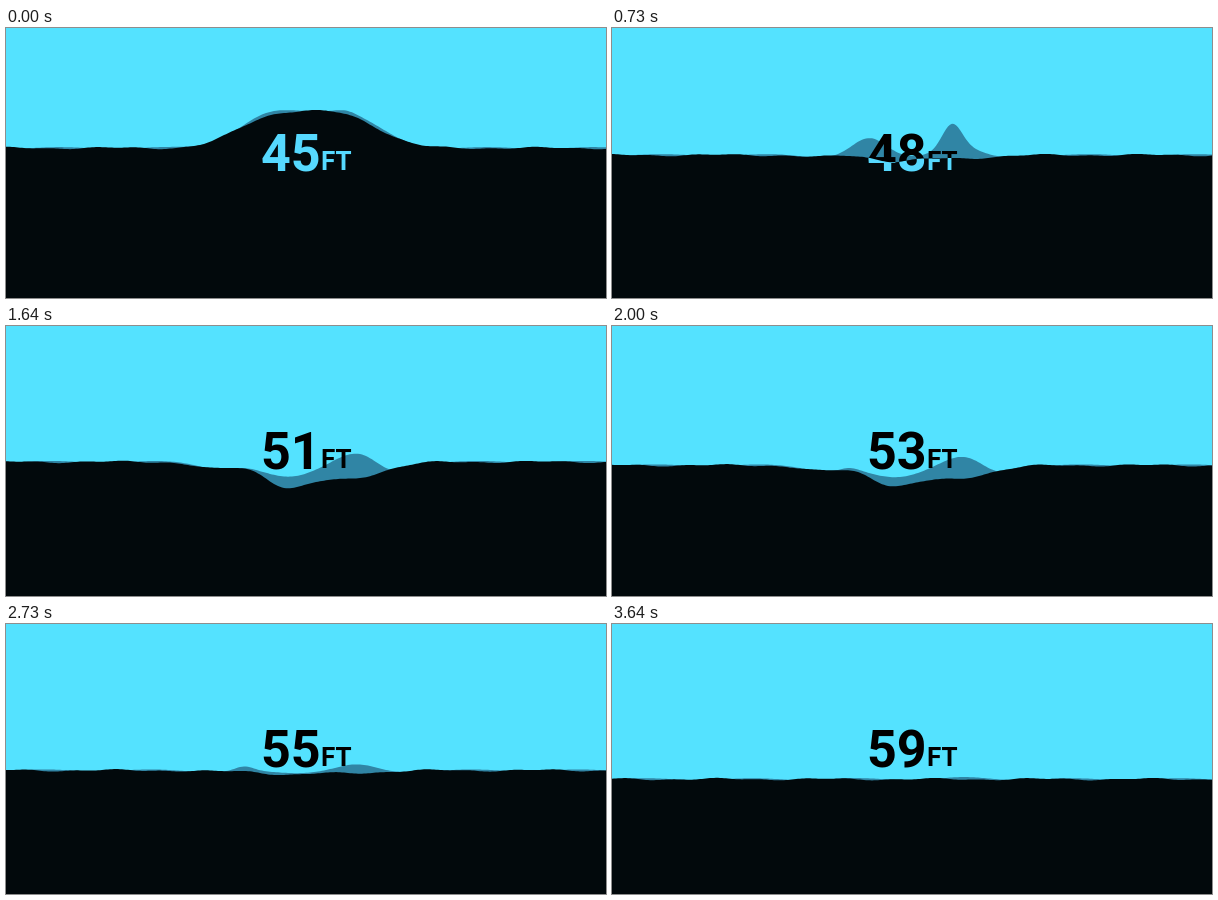
An HTML page with a canvas for the animation above (3670 ms loop, 600 by 270 pixels).

```html
<!DOCTYPE html>
<html lang="en">
<head>
<meta charset="utf-8">
<title>Rising water</title>
<style>
  html, body { margin: 0; height: 100%; overflow: hidden; background: #54e2ff; }
  canvas { display: block; }
</style>
</head>
<body>
<canvas width="600" height="270"></canvas>
<script>
const ctx = document.querySelector('canvas').getContext('2d');
const LOOP = 3670;
const BEAT = 555, REST = 75;   // the motion rests briefly at the start of each beat

const pulse = (d, width, power = 2) => Math.exp(-(Math.abs(d / width) ** power));

// A bump in the surface that swells and fades around one moment (positive = down)
const bump = (height, x, width, time, duration) => ({ height, x, width, time, duration });

const frontBumps = [
  bump(22, 280, 32, 1600, 838),
  bump(17, 340, 48, 1600, 838),
  bump(7, 210, 28, 1600, 838),
];
const backBumps = [
  bump(15, 280, 38, 1600, 838),
  bump(10, 385, 22, 1600, 838),
  bump(6, 215, 30, 1600, 838),
  bump(-30, 340, 14, 580, 370),
  bump(-19, 258, 24, 620, 420),
  bump(-9, 350, 28, 1800, 1300),
  bump(-5, 238, 13, 2500, 700),
];

const bumpsAt = (bumps, x, t) => bumps.reduce((sum, b) =>
  sum + b.height * pulse(x - b.x, b.width) * pulse(t - b.time, b.duration), 0);

function waterPath(surface) {
  const path = new Path2D();
  path.moveTo(0, 270);
  for (let x = 0; x <= 600; x += 2) path.lineTo(x, surface(x));
  path.lineTo(600, 270);
  path.closePath();
  return path;
}

function drawDepth(depth, color) {
  ctx.fillStyle = color;
  ctx.font = 'bold 52px Roboto, sans-serif';
  ctx.fillText(depth, 255, 143);
  ctx.font = 'bold 26px Roboto, sans-serif';
  ctx.fillText('FT', 315, 142);
}

function draw(t) {
  const depth = Math.ceil(45 + t / 280);
  const level = x => 120 + t * 0.00965 - 37.5 * pulse(x - 303, 81, 3) * pulse(t, 450);

  const front = waterPath(x => level(x) + bumpsAt(frontBumps, x, t)
    - 0.8 * Math.cos(x / 17) - 0.5 * Math.cos(x / 7 + t / 900));
  const back = waterPath(x => level(x) + bumpsAt(backBumps, x, t)
    + 0.9 * Math.cos(x / 17 + t / 3000));

  ctx.fillStyle = '#54e2ff';
  ctx.fillRect(0, 0, 600, 270);
  ctx.fillStyle = '#3085a5';
  ctx.fill(back);
  drawDepth(depth, '#000');
  ctx.fillStyle = '#02090c';
  ctx.fill(front);

  ctx.save();
  ctx.clip(front);
  drawDepth(depth, '#56d9ff');
  ctx.restore();
}

function tick() {
  const t = performance.now() % LOOP;
  const sinceBeat = t % BEAT;
  draw(sinceBeat < REST ? t - sinceBeat : t);
  requestAnimationFrame(tick);
}
tick();
</script>
</body>
</html>
```
